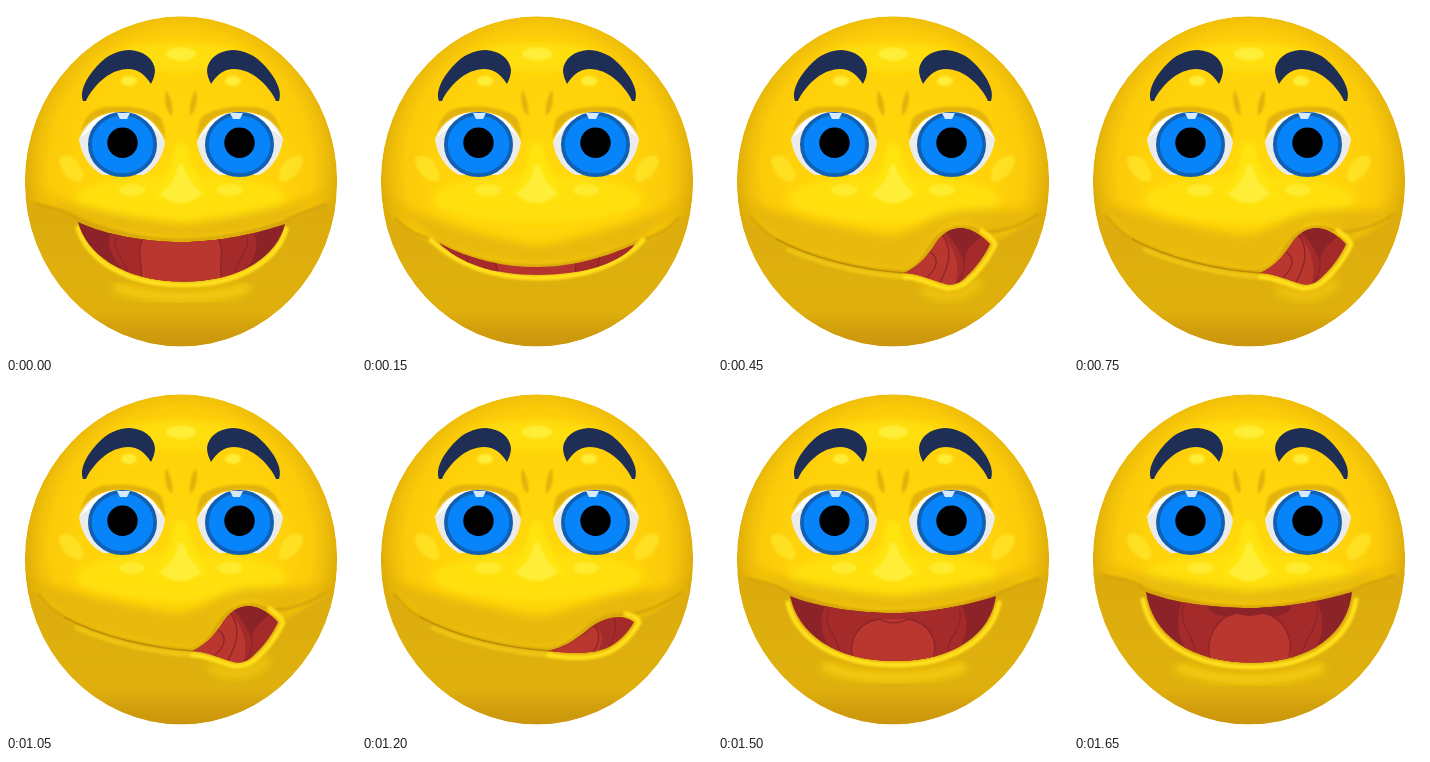
An HTML page for the animation above (3.65 s loop, 350 by 350 pixels).

```html
<!DOCTYPE html>
<html lang="en">
<head>
<meta charset="utf-8">
<title>Chewing smiley</title>
<style>
html, body { margin: 0; width: 100%; height: 100%; overflow: hidden; background: #fff; }
svg { display: block; width: 100vw; height: 100vh; }
.pose { visibility: hidden; animation: 3650ms step-end infinite; }
#grin { animation-name: grin; }
#thin { animation-name: thin; }
#shut { animation-name: shut; }
#chew { animation-name: chew; }
#part { animation-name: part; }
#wide { animation-name: wide; }
@keyframes grin { 0% { visibility: visible } 4.1096%, 100% { visibility: hidden } }
@keyframes thin {
  0%, 8.2192%, 41.0959%, 100% { visibility: hidden }
  4.1096%, 36.9863% { visibility: visible }
}
@keyframes shut {
  0%, 12.3288%, 20.5479%, 28.7671%, 36.9863%, 100% { visibility: hidden }
  8.2192%, 16.4384%, 24.6575%, 32.8767% { visibility: visible }
}
@keyframes chew {
  0%, 16.4384%, 24.6575%, 32.8767%, 100% { visibility: hidden }
  12.3288%, 20.5479%, 28.7671% { visibility: visible }
}
@keyframes part { 0%, 45.2055%, 100% { visibility: hidden } 41.0959% { visibility: visible } }
@keyframes wide { 0% { visibility: hidden } 45.2055%, 100% { visibility: visible } }
.chin { fill: url(#gold); filter: url(#soft2); }
.shade { fill: #dfae08; opacity: .7; filter: url(#soft4); }
.lip { fill: none; stroke: #ffe01c; stroke-width: 5; stroke-linecap: round; filter: url(#soft1); }
.groove { fill: none; stroke: #d2a008; stroke-width: 2.5; stroke-linecap: round; filter: url(#soft1); }
.glow { fill: none; stroke: #f8d00c; stroke-width: 9; stroke-linecap: round; filter: url(#soft4); }
.line { fill: none; stroke: #b98a06; stroke-width: 1.3; }
.dark { fill: #8c2328; }
.mid { fill: #a52b2b; }
.tongue { fill: #ba372f; }
.crease { fill: none; stroke: #8c2328; stroke-width: 1.3; }
.shine { fill: #ffee38; filter: url(#soft1); }
</style>
</head>
<body>
<svg viewBox="0 0 350 350">
<defs>
  <radialGradient id="skin" cx=".5" cy=".46" r=".54">
    <stop offset="0" stop-color="#ffd80b"/><stop offset=".6" stop-color="#ffd20a"/>
    <stop offset=".78" stop-color="#fbca09"/><stop offset=".86" stop-color="#eebd09"/>
    <stop offset=".94" stop-color="#dcaa09"/><stop offset="1" stop-color="#cc970a"/>
  </radialGradient>
  <linearGradient id="gold" gradientUnits="userSpaceOnUse" x1="0" y1="195" x2="0" y2="340">
    <stop offset="0" stop-color="#dcab08"/><stop offset=".45" stop-color="#deaf09"/>
    <stop offset=".76" stop-color="#e0b00a"/><stop offset=".88" stop-color="#d29f09"/>
    <stop offset="1" stop-color="#cb960a"/>
  </linearGradient>
  <filter id="soft1" x="-20%" y="-40%" width="140%" height="180%"><feGaussianBlur stdDeviation=".9"/></filter>
  <filter id="soft2" x="-10%" y="-10%" width="120%" height="120%"><feGaussianBlur stdDeviation="2"/></filter>
  <filter id="soft4" x="-30%" y="-60%" width="160%" height="220%"><feGaussianBlur stdDeviation="4"/></filter>
  <clipPath id="head"><ellipse cx="175" cy="175.300" rx="156.200" ry="165"/></clipPath>

  <path id="grinM" d="M72 216C100 229 140 236 176 236C214 236 252 227 279 218C272 249 236 275.500 178 275.500C115 275.500 80 247 72 216Z"/>
  <path id="thinM" d="M77 237C108 254 143 261 175 261C213 261 247 250 273 238C261 255 225 269 176 269C130 269 98 257 77 237Z"/>
  <path id="shutM" d="M186 267C202 263 213 256 224 247C234 238 246 233 256 233C263 233 268 235 272 238C266 249 256 259 245 264C228 271 204 269 186 267Z"/>
  <path id="chewM" d="M186 267C199 261 207 253 215 241C222 229 231 222 244 222C255 223 265 230 272 238C267 249 259 261 249 270C243 277 235 280 228 278C213 274 202 268 186 267Z"/>
  <path id="partM" d="M72 212C100 223 140 229 176 229C214 229 253 220 278 212C273 250 236 277 178 277C115 277 80 249 72 212Z"/>
  <path id="wideM" d="M72 208C100 219 140 224 176 224C214 224 254 215 278 208C274 250 236 278.500 178 278.500C115 278.500 78 250 72 208Z"/>
  <clipPath id="grinC"><use href="#grinM"/></clipPath>
  <clipPath id="thinC"><use href="#thinM"/></clipPath>
  <clipPath id="shutC"><use href="#shutM"/></clipPath>
  <clipPath id="chewC"><use href="#chewM"/></clipPath>
  <clipPath id="partC"><use href="#partM"/></clipPath>
  <clipPath id="wideC"><use href="#wideM"/></clipPath>

  <g id="eye">
    <path d="M73 133C77 122 86 112 98 109C110 106 124 106 135 110C148 116 156 126 159 136C157 151 149 163 137 169H97C83 162 75 148 73 133Z" fill="#ebebeb"/>
    <path d="M85 117C94 108 104 106 116 106C130 106 141 110 148 118L159 136C154 128 146 120 138 118H98C88 121 80 126 73 133Z" fill="#fff"/>
    <ellipse cx="116.500" cy="138.500" rx="32.600" ry="30.600" fill="#0884fb" stroke="#1260b2" stroke-width="3.800"/>
    <circle cx="116.500" cy="136.800" r="15.200" fill="#000"/>
  </g>
  <g id="upper">
    <path d="M75 127C77 112 86 102 102 101C124 99 145 103 155 112C158 119 159 126 159 134C152 116 138 106 116 106C95 106 82 114 75 127Z" fill="#e2b209" filter="url(#soft1)"/>
    <path d="M160 84C165 91 167 101 166 110C160 105 158 95 160 84Z" fill="#e2b108" filter="url(#soft1)"/>
    <path d="M77 95C73 84 82 70 91 60C101 49 112 44 124 44C138 45 148 53 149 64C149 69 147 74 145 78C141 72 136 66 129 64C119 61 106 65 96 74C89 80 83 88 80 95Z" fill="#1f2e54"/>
    <ellipse class="shine" cx="123" cy="75" rx="8" ry="5"/>
    <path class="shine" d="M53 152C59 147 70 151 74 160C78 168 78 173 75 176C66 177 52 165 53 152Z" opacity=".55"/>
    <ellipse class="shine" cx="126" cy="184" rx="13" ry="6" opacity=".8"/>
    <use href="#eye"/>
  </g>
</defs>

<g clip-path="url(#head)">
  <ellipse cx="175" cy="175.300" rx="156.200" ry="165" fill="url(#skin)"/>
  <ellipse cx="175" cy="51" rx="66" ry="15" fill="#ffde0c" filter="url(#soft4)"/>
  <ellipse cx="175" cy="193" rx="105" ry="24" fill="#ffe00b" filter="url(#soft4)"/>
  <ellipse class="shine" cx="175" cy="48" rx="15" ry="6.500"/>

  <g id="grin" class="pose">
    <path class="shade" d="M26 186C60 198 120 212 176 218C230 212 290 198 325 186L278 216C214 239 136 239 74 214Z"/>
    <path class="chin" d="M0 185C30 202 52 199 74 211C120 232 145 236 176 236C220 236 250 228 279 215C302 202 318 202 350 185V350H0Z"/>
    <path class="groove" d="M30 198C48 202 62 205 75 215C116 229 142 234 176 234C214 234 248 226 278 216C292 207 307 204 320 198"/>
    <path class="glow" d="M112 282C148 294 205 294 240 282"/>
    <path class="lip" d="M72 222C81 252 117 279 178 279C235 279 272 253 280 223"/>
    <use href="#grinM" class="dark"/>
    <g clip-path="url(#grinC)">
      <path class="mid" d="M106 225C97 240 108 256 132 280H220C252 258 255 240 246 222Z"/>
      <path class="crease" d="M111 232C104 243 118 251 121 266M240 230C246 242 232 252 229 266"/>
      <path class="tongue" d="M137 232C130 247 137 259 134 280H217C211 259 220 247 212 232Z"/>
      <path class="crease" d="M137 232C130 247 137 259 135 272M212 232C220 247 211 259 216 272"/>
    </g>
  </g>

  <g id="thin" class="pose">
    <path class="shade" d="M27 196C60 211 120 231 176 240C230 231 290 211 324 196L273 238C213 265 136 265 77 238Z"/>
    <path class="chin" d="M0 195C30 215 50 229 77 238C112 258 143 262 175 262C213 262 248 252 273 239C302 228 320 215 350 195V350H0Z"/>
    <path class="groove" d="M34 213C48 229 62 230 77 237C108 254 143 260 175 260C213 260 247 249 273 237C288 231 303 228 317 212"/>
    <path class="lip" d="M69 234C94 258 128 272 176 272C225 272 262 257 281 234"/>
    <use href="#thinM" fill="#b5342e"/>
    <g clip-path="url(#thinC)">
      <path class="mid" d="M70 230H132L137 270H70ZM213 255L240 240H280V270H213Z"/>
      <path class="crease" d="M104 246L107 264M132 255L137 270M214 255L213 270M239 247L234 266"/>
    </g>
  </g>

  <g id="shut" class="pose">
    <path class="shade" d="M28 198C60 206 120 222 172 232C200 232 235 213 270 208C290 205 310 207 326 200L273 237C236 228 214 262 188 267C144 263 96 254 60 235Z"/>
    <path class="chin" d="M0 195C28 211 40 222 58 233C96 253 144 264 188 267C206 263 216 252 226 245C239 235 253 230 272 237C302 222 320 212 350 195V350H0Z"/>
    <path class="groove" d="M32 210C42 222 48 228 58 233C95 253 144 264 187 266C205 262 216 252 226 243C237 234 252 229 264 231C284 229 306 218 320 208"/>
    <path class="lip" d="M71 244C107 260 151 269 187 271" opacity=".45"/>
    <path class="lip" d="M187 271C209 275 230 275 247 268C261 261 270 251 277 239C276 234 270 231 264 230"/>
    <path class="line" d="M58 233C95 253 144 264 188 267"/>
    <use href="#shutM" class="mid"/>
    <g clip-path="url(#shutC)">
      <path class="tongue" d="M186 270C204 260 220 255 232 242C246 250 240 265 228 275Z"/>
      <path class="crease" d="M232 242C240 250 237 260 230 270M252 234C256 243 252 254 247 262"/>
    </g>
  </g>

  <g id="chew" class="pose">
    <path class="shade" d="M28 198C60 206 120 222 168 229C195 229 212 208 240 205C274 202 304 208 326 200L273 237C250 209 228 216 214 239C207 255 198 264 187 267C144 263 96 254 60 235Z"/>
    <path class="chin" d="M0 195C28 211 40 222 58 233C96 253 144 264 187 267C205 260 209 246 217 236C228 221 253 216 273 237C302 222 320 212 350 195V350H0Z"/>
    <path class="groove" d="M32 210C42 222 48 228 58 233C95 253 144 264 186 266C205 260 208 245 217 234C228 221 246 217 262 226C284 227 306 218 320 208"/>
    <path class="glow" d="M206 284C225 294 246 292 260 277" opacity=".7"/>
    <path class="lip" d="M71 244C107 260 151 269 187 271" opacity=".45"/>
    <path class="lip" d="M187 271C204 272 214 279 228 282C238 283 246 279 252 273C262 264 271 251 277 239C276 234 270 229 264 225"/>
    <path class="line" d="M58 233C95 253 144 264 187 267"/>
    <use href="#chewM" class="mid"/>
    <g clip-path="url(#chewC)">
      <path class="tongue" d="M186 268C203 258 214 243 224 228C234 239 245 258 236 282H210Z"/>
      <path class="dark" d="M226 225C240 218 255 222 263 231C255 239 247 243 246 256C241 244 235 233 226 225Z"/>
      <path class="crease" d="M224 228C235 243 232 258 222 276M212 246C222 252 219 263 209 271M246 254C247 263 244 271 239 278"/>
    </g>
  </g>

  <g id="part" class="pose">
    <path class="shade" d="M26 182C60 194 120 206 176 212C230 206 290 194 325 182L278 211C214 232 136 232 74 210Z"/>
    <path class="chin" d="M0 180C30 198 52 196 74 208C120 225 145 229 176 229C220 229 250 221 278 209C302 198 320 198 350 180V350H0Z"/>
    <path class="groove" d="M30 195C48 199 61 201 73 211C116 224 142 228 176 228C214 228 250 219 278 211C292 203 307 200 320 195"/>
    <path class="glow" d="M108 283C145 297 207 297 244 283"/>
    <path class="lip" d="M70 219C78 254 117 281 178 281C236 281 274 254 281 219"/>
    <use href="#partM" class="dark"/>
    <g clip-path="url(#partC)">
      <path class="mid" d="M108 220C98 240 105 260 126 282H226C250 260 254 240 242 219Z"/>
      <path class="tongue" d="M135 280C130 261 138 239 160 235H190C214 239 222 261 215 280Z"/>
      <path class="crease" d="M111 226C104 241 118 250 121 266M241 225C247 240 232 252 229 266M135 275C130 257 139 238 162 235C172 241 182 239 190 235C213 239 221 258 215 275"/>
    </g>
  </g>

  <g id="wide" class="pose">
    <path class="shade" d="M26 180C60 190 120 201 176 207C230 201 290 190 325 180L278 207C214 227 136 227 74 206Z"/>
    <path class="chin" d="M0 178C30 195 52 192 74 204C120 220 145 224 176 224C220 224 250 216 278 205C302 194 320 195 350 178V350H0Z"/>
    <path class="groove" d="M30 192C48 195 61 197 73 207C116 219 142 223 176 223C214 223 250 214 278 207C292 199 307 196 320 192"/>
    <path class="glow" d="M106 284C145 299 207 299 246 284"/>
    <path class="lip" d="M69 216C77 256 116 283 178 283C237 283 275 256 282 216"/>
    <use href="#wideM" class="dark"/>
    <g clip-path="url(#wideC)">
      <path class="mid" d="M109 215C100 238 103 260 124 282H228C250 260 254 238 241 214Z"/>
      <path class="crease" d="M110 220C103 239 118 248 121 266M242 219C248 239 233 250 229 266"/>
      <path class="dark" d="M133 222H218C210 239 190 228 176 232C160 228 142 239 133 222Z"/>
      <path class="tongue" d="M137 282C130 259 140 233 163 229C170 232 181 232 189 229C212 233 222 259 215 282Z"/>
      <path class="crease" d="M136 273C132 255 141 233 163 229C170 232 181 232 189 229C211 233 220 256 215 273"/>
    </g>
  </g>

  <path d="M169 140C173 135 177 135 181 140C185 165 199 178 202 190C185 195 164 195 148 190C154 178 165 165 169 140Z" fill="#ffe40f" filter="url(#soft2)"/>
  <path class="shine" d="M172 160C175 157 178 158 179 163C182 175 191 182 196 188C190 193 183 197 175 197C165 197 158 192 154 188C162 181 170 174 172 160Z"/>
  <use href="#upper"/>
  <use href="#upper" transform="matrix(-1 0 0 1 350 0)"/>
  <g fill="#d6e9ff">
    <path d="M111 107H124L121 113H114Z"/>
    <path d="M224 107H237L234 113H227Z"/>
  </g>
</g>
</svg>
</body>
</html>
```
